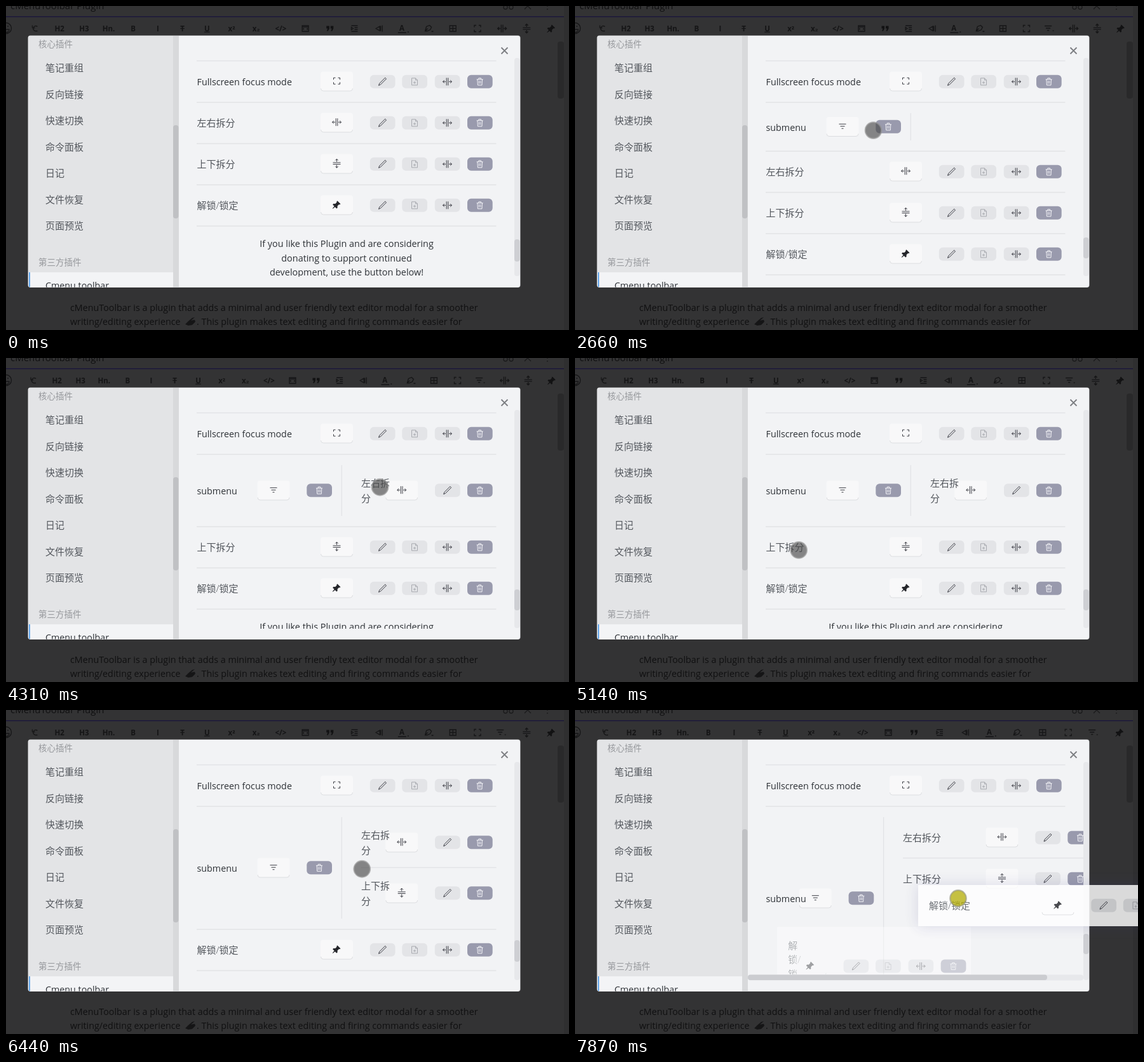
These frames come from a looping animation (886x511 px, 7.99 s). An HTML page:

```html
<!DOCTYPE html>
<html lang="zh">
<head>
<meta charset="utf-8">
<title>Toolbar submenu demo</title>
<style>
  html, body { margin: 0; width: 100%; height: 100%; overflow: hidden; background: #333334; }
  svg { display: block; width: 100vw; height: 100vh; }
  text { font: 14.3px "Open Sans", "Noto Sans CJK SC", "Noto Sans CJK", sans-serif; fill: #2e3237; white-space: pre; }
  text.cjk { font-size: 15px; font-weight: 300; fill: #53575d; }
  text.head { font-size: 13.5px; font-weight: 300; fill: #96989c; }
  text.dark { fill: #101011; }
  text.mid { text-anchor: middle; font-size: 14.4px; }
  .icon { fill: none; stroke: #3c3d45; stroke-width: 1; }
  .soft { stroke: #a8aab0; }
  .light { stroke: #f4f4f8; }
  .solid { fill: #25262b; stroke: none; }
  .rule { stroke: #e2e3e6; stroke-width: 1.3; }
  .edge { fill: none; stroke: #dcdde0; stroke-width: 1; }
  #bar .icon { stroke: #161617; stroke-width: 1.3; }
  #bar .solid { fill: #121213; stroke: none; }
  #bar text { fill: #151516; font-size: 11.5px; font-weight: 700; text-anchor: middle; }
  .card { opacity: .82; filter: drop-shadow(0 0 11px rgba(60, 60, 130, .2)); }
</style>
</head>
<body>
<svg viewBox="0 0 886 511" preserveAspectRatio="none">
  <defs>
    <path id="pencil" d="M-6 6l1.200-3.200 9-9 1.800 1.800-9 9z"/>
    <path id="page" d="M-4.500-5.500h6l3 3v8h-9zM1.500-5.500v3h3M-2 1.500h4M0-.5v4"/>
    <path id="h" d="M-1.300-6v12M1.300-6v12M-2.500 0h-4.500m2.300-2.300L-7 0l2.300 2.300M2.500 0h4.500m-2.300-2.300L7 0l-2.300 2.300"/>
    <path id="v" d="M-6-1.300h12M-6 1.300h12M0-2.500v-4.500m-2.300 2.300L0-7l2.300 2.300M0 2.500v4.500m-2.300-2.300L0 7l2.300-2.300"/>
    <path id="trash" d="M-5-3.500h10M-1.800-3.500v-2h3.600v2M-3.800-3.500l.5 9h6.600l.5-9M-1.200-1.300v4.500M1.200-1.300v4.500"/>
    <path id="full" d="M-5-2v-3h3M2-5h3v3M5 2v3h-3M-2 5h-3v-3"/>
    <path id="filter" d="M-5.500-3.500h11M-3.500 0h7M-1.500 3.500h3"/>
    <path id="pin" d="M1-6l5 5-1.500 1-1-.3-2.500 2.500.2 2.600-1.400 1.400-2.500-2.500-3.500 2.800-.5-.5 2.800-3.500-2.500-2.500 1.400-1.400 2.600.2 2.500-2.500-.3-1z"/>
    <path id="undo" d="M4 4h-2a4 4 0 1 1 2-7M-4-1h4m-4 0v-4"/>
    <path id="box" d="M-5-4.500h10v9h-10zM-5-2.500h10M-2.500-.5l-1 1.200 1 1.200M2.500-.5l1 1.200-1 1.200"/>
    <path id="quote" d="M-5.500-4h4.500v4l-2 4h-2l1.500-4h-2zM1-4h4.500v4l-2 4h-2l1.500-4h-2z"/>
    <path id="indent" d="M-5-4.500h10M0-1.500h5M0 1.500h5M-5 4.500h10M-5-2l3 2-3 2z"/>
    <path id="outdent" d="M5-5v10M2.500-4v8M1-3.500L-5 0 1 3.500z"/>
    <path id="pen" d="M-5 4l2-7 5-2 3 3-2 4-5 2zM-5 4l4-4M5 4.500h3"/>
    <path id="grid" d="M-5-4.500h10v9h-10zM-5 0h10M0-4.500v9"/>
    <clipPath id="modalClip"><rect x="35" y="47" width="774" height="396.500" rx="4"/></clipPath>
    <clipPath id="listClip"><rect x="272" y="78" width="528" height="349"/></clipPath>
    <clipPath id="shortClip"><rect x="272" y="78" width="528" height="339"/></clipPath>
  </defs>

  <rect width="886" height="511" fill="#333334"/>
  <rect y="16" width="886" height="1.600" fill="#1d1a3a"/>
  <rect x="878" width="8" height="511" fill="#2f2f30"/>
  <rect x="868" y="56" width="10" height="90" rx="4" fill="#29292a"/>
  <text class="dark" x="7" y="5" style="font-size:15px">cMenuToolbar Plugin</text>
  <g fill="none" stroke="#1a1a1b" stroke-width="1.300">
    <circle cx="786" cy="2" r="3"/><circle cx="795" cy="2" r="3"/>
    <path d="M816-5l10 10M826-5l-10 10M852-1v2M852 4v2"/>
  </g>
  <text class="dark" x="101" y="481">cMenuToolbar is a plugin that adds a minimal and user friendly text editor modal for a smoother</text>
  <text class="dark" x="101" y="503">writing/editing experience</text>
  <path d="M282 502l5-5 6-5 4-1-6 5 6-1 1 3-5 5-6 1z" fill="#151516"/>
  <text class="dark" x="300" y="503">. This plugin makes text editing and firing commands easier for</text>
  <g id="bar"></g>

  <rect x="34.500" y="46.500" width="775" height="397.500" rx="4" fill="#c9cacc"/>
  <g clip-path="url(#modalClip)">
    <rect x="35" y="47" width="775" height="397" fill="#f2f3f5"/>
    <rect x="35" y="47" width="237" height="397" fill="#e3e4e6"/>
    <rect x="263" y="47" width="9" height="397" fill="#d8d9db"/>
    <rect x="263" y="188" width="8.500" height="147" rx="4" fill="#c0c1c4"/>
    <rect x="35" y="420" width="228" height="24" fill="#f3f4f6"/>
    <rect x="36" y="420" width="2" height="24" fill="#62a4e8"/>
    <g id="side"></g>
    <g id="list"></g>
  </g>
  <path d="M779.500 65.500l10 10M789.500 65.500l-10 10" stroke="#7d7f83" stroke-width="1.800"/>
  <g id="overlay"></g>
</svg>

<script>
const LOOP = 7990;
const $ = id => document.getElementById(id);

// Moments when the picture changes: [first, last, count]
const BURSTS = [
  [0, 0, 1], [130, 900, 8], [1490, 1600, 2], [1820, 1820, 1], [2320, 3030, 7],
  [3270, 3960, 7], [4080, 4080, 1], [4310, 4310, 1], [4540, 5250, 7],
  [5370, 6080, 7], [6200, 6800, 6], [6940, 7280, 4], [7510, 7870, 4]
];

const PATH = [
  [130, 617, 477], [500, 636, 270], [900, 648, 122.5], [2205, 648, 122.5], [2700, 460, 200], [3030, 347, 260],
  [3270, 350, 258], [3615, 575, 193], [3740, 600, 160], [3845, 602, 178], [3960, 590, 203],
  [4430, 588, 204], [5132, 352, 303], [5370, 353, 303], [5962, 594, 236], [6080, 600, 229],
  [6320, 600, 229], [6800, 441, 316], [7167, 390, 351], [7280, 362, 370], [7510, 364, 367],
  [7870, 603, 297]
];

const FULL = { name: 'Fullscreen focus mode', icon: 'full' };
const ITEMS = [
  { name: '左右拆分', icon: 'h', wrap: ['左', '右', '拆', '分'], extra: 0 },
  { name: '上下拆分', icon: 'v', wrap: ['上', '下', '拆', '分'], extra: 0 },
  { name: '解锁/锁定', icon: 'pin', wrap: ['解', '锁/', '锁', '定'], extra: 5 }
];
const DRAGS = [
  { item: ITEMS[0], from: 3270, enter: 3560, to: 4310, dx: 49, dy: 29, thumb: 785 },
  { item: ITEMS[1], from: 5365, enter: 5906, to: 6435, dx: 52.5, dy: 37, thumb: 748 },
  { item: ITEMS[2], from: 7505, enter: 7770, to: LOOP, dx: 63, dy: 21, thumb: 743 }
];

const lerp = (a, b, p) => a + (b - a) * p;
const ease = p => p <= 0 ? 0 : p >= 1 ? 1 : p < .5 ? 2 * p * p : 1 - 2 * (1 - p) ** 2;

function snap(t) {
  const [first, last, count] = BURSTS.filter(b => b[0] <= t).pop();
  if (count === 1) return first;
  const step = (last - first) / (count - 1);
  return Math.min(last, first + Math.floor((t - first + 16) / step) * step);
}

function cursorAt(t) {
  const i = PATH.findIndex(k => k[0] >= t);
  if (i < 0) return PATH[PATH.length - 1].slice(1);
  const b = PATH[i], a = PATH[i - 1] || b;
  const p = a === b ? 0 : (t - a[0]) / (b[0] - a[0]);
  return [lerp(a[1], b[1], p), lerp(a[2], b[2], p)];
}

// Drawing helpers; y is a vertical centre
const label = (x, y, s, cls = /[a-z]/i.test(s) ? '' : 'cjk') =>
  `<text x="${x}" y="${y + 5.3}" class="${cls}">${s}</text>`;
const rect = (x, y, w, h, fill, r = 0) =>
  `<rect x="${x}" y="${y}" width="${w}" height="${h}" rx="${r}" fill="${fill}"/>`;
const rule = (x1, y1, x2, y2) => `<path class="rule" d="M${x1} ${y1}L${x2} ${y2}"/>`;
const icon = (id, x, y, cls = '') =>
  `<use href="#${id}" x="${x}" y="${y}" class="icon ${/pin|quote/.test(id) ? 'solid' : cls}"/>`;
const button = (id, x, y) =>
  rect(x - 25.5, y - 15.5, 51, 30.5, 'rgba(255,255,255,.4)', 4) +
  `<path class="edge" d="M${x - 25} ${y + 11}q0 4 4 4h42q4 0 4-4"/>` + icon(id, x, y - .8);
const pill = (id, x, y, cls = '') =>
  rect(x - 19.7, y - 10.7, 39.7, 21, id === 'trash' ? '#999aad' : '#e3e4e7', 6) + icon(id, x, y - .2, cls);
const trash = (x, y) => pill('trash', x, y, 'light');
const tools = (x, y) => pill('pencil', x, y) + pill('page', x + 50.5, y, 'soft') +
  pill('h', x + 102, y) + trash(x + 153.2, y);

const row = (x, y, item, pad = 0) =>
  label(x + pad, y + 33, item.name) + button(item.icon, x + 220, y + 32) + tools(x + 292, y + 32.5);

const rowCard = (x, y, item) => rect(x, y, 471, 65, '#fff') + row(x, y, item, 17);

function narrowGhost(x, y, { wrap, icon: id, extra }) {
  const lines = wrap.map((s, i) => label(x + 17, y + 29 + 22.7 * i, s)).join('');
  return `<g opacity=".4">${rect(x, y, 300 + extra, 124, '#fff')}${lines}` +
    `${button(id, x + 47 + extra, y + 61.5)}${tools(x + 119 + extra, y + 62)}</g>`;
}

// Submenu entry with wrapped name, or on one line while the list is widened
function subItem(i, item, wide, extra) {
  if (wide) {
    const y = 169 + 65 * i, x = 516;
    return (i ? rule(x, y - .5, 830, y - .5) : '') + label(x, y + 33, item.name) +
      button(item.icon, x + 151 + extra, y + 32) + pill('pencil', x + 223 + extra, y + 32.5) +
      trash(x + 274 + extra, y + 32.5);
  }
  const y = 169 + 80 * i;
  return (i ? rule(559, y - .5, 771.5, y - .5) : '') + button(item.icon, 622.7, y + 40) +
    label(559, y + 29, item.name.slice(0, 3)) + label(559, y + 52.5, item.name.slice(3)) +
    pill('pencil', 694.7, y + 40) + trash(745.7, y + 40);
}

function submenu(height, inside, wide, extra) {
  const y = 152 + height / 2, shift = wide ? 42.7 : 0;
  return rule(300, 152, 771.5, 152) + button('filter', 421 - shift, y) + label(300.5, y + 1, 'submenu') +
    trash(493 - shift, y) + rule(528.3 - shift, 169, 528.3 - shift, 152 + height - 17) +
    inside.map((item, i) => subItem(i, item, wide, extra)).join('');
}

function list(t, drag) {
  const inside = DRAGS.filter(d => t >= d.to).map(d => d.item);
  const outside = ITEMS.filter(item => !inside.includes(item));
  const n = inside.length, wide = drag && t >= drag.enter;
  const p = wide ? ease((t - drag.enter) / 500) : 0;
  const restH = t < 1600 ? 0 : n ? 34 + 80 * n : 77;
  const openH = 160 + 65 * n;
  let out = rule(300, 86.5, 771.5, 86.5);
  out += t >= 1490 && t < 1590 ? rowCard(300.5, 87, FULL) : row(300.5, 87, FULL);
  if (restH) out += submenu(wide ? openH : restH, inside, wide, wide ? drag.item.extra : 0);

  outside.forEach((item, i) => {
    const held = drag && item === drag.item;
    if (held && wide) return;
    const from = 152 + restH + 65 * i;
    const y = wide ? lerp(from, 152 + openH + 65 * (i - 1), p) : from;
    out += rule(300, y, 771.5, y);
    out += held ? `<g opacity=".4">${rowCard(300.5, y, item)}</g>` : row(300.5, y, item);
  });
  if (!wide) {
    const end = 152 + restH + 65 * outside.length;
    out += rule(300, end, 771.5, end) +
      ['If you like this Plugin and are considering', 'donating to support continued', 'development, use the button below!']
        .map((s, i) => label(536, end + 28 + 22.5 * i, s, 'mid')).join('');
  } else {
    out += narrowGhost(lerp(301, 516, p), lerp(152 + restH, 169 + 65 * n, p), drag.item);
  }

  const [top, size] = wide ? [353, 32] : t < 1600 ? [368, 35] : n > 1 ? [363, 34] : [365, 33];
  const bars = rect(800, 82, 8.5, 344, '#e7e8eb', 4) + rect(800, top, 8.5, size, '#cecfd3', 4) +
    (wide ? rect(272, 417.5, 528, 9, '#e7e8eb', 4) + rect(272, 417.5, drag.thumb - 272, 8.5, '#cbccd0', 4) : '');
  return `<g clip-path="url(#${wide ? 'shortClip' : 'listClip'})">${out}</g>${bars}`;
}

function toolbar(t) {
  const ids = ['undo', 'H2', 'H3', 'Hn.', 'B', 'I', 'T', 'U', 'x²', 'x₂', '&lt;/&gt;', 'box', 'quote',
    'indent', 'outdent', 'A', 'pen', 'grid', 'full'];
  if (t >= 1820) ids.push('filter');
  if (t < 4540) ids.push('h');
  if (t < 6555) ids.push('v');
  ids.push('pin');
  const pitch = 890 / (ids.length + 1);
  const styles = { I: 'font-style="italic"', T: 'text-decoration="line-through"', U: 'text-decoration="underline"' };
  const smile = '<g class="icon"><circle cx="0" cy="35" r="8.500"/><path d="M-4 37a4.500 4.500 0 0 0 9 0zM3 31v2"/></g>';
  return smile + ids.map((id, i) => {
    const x = pitch * (i + 1.5) - 12.6;
    if (id === 'A') return `<text x="${x - 3}" y="39">A</text><path class="icon" d="M${x - 9} 42h13M${x + 6} 41h2"/>`;
    if (id === 'filter') return icon(id, x - 3, 35) + `<path class="icon" d="M${x + 4} 39h2"/>`;
    return $(id) ? icon(id, x, 35.5) : `<text x="${x}" y="39.5" ${styles[id] || ''}>${id}</text>`;
  }).join('');
}

function overlay(t, drag) {
  if (t < 130) return '';
  const [x, y] = cursorAt(t);
  const pressed = drag || (t >= 1490 && t < 1590);
  const colors = pressed ? ['rgba(178,172,0,.74)', 'rgba(150,150,130,.6)'] : ['rgba(72,72,72,.65)', 'rgba(150,150,150,.65)'];
  const card = drag ? `<g class="card">${rowCard(x - drag.dx, y - drag.dy, drag.item)}</g>` : '';
  return card + `<circle cx="${x}" cy="${y}" r="12.700" fill="${colors[0]}" stroke="${colors[1]}" stroke-width="2.400"/>`;
}

$('side').innerHTML = label(51, 59.5, '核心插件', 'head') + label(51, 403.5, '第三方插件', 'head') +
  ['笔记重组', '反向链接', '快速切换', '命令面板', '日记', '文件恢复', '页面预览']
    .map((s, i) => label(62, 98 + 41.5 * i, s)).join('') + label(62, 440.5, 'Cmenu toolbar');

let shown = -1;
function frame() {
  const t = snap(performance.now() % LOOP);
  if (t !== shown) {
    shown = t;
    const drag = DRAGS.find(d => t >= d.from && t < d.to);
    $('bar').innerHTML = toolbar(t);
    $('list').innerHTML = list(t, drag);
    $('overlay').innerHTML = overlay(t, drag);
  }
  requestAnimationFrame(frame);
}
frame();
</script>
</body>
</html>
```
